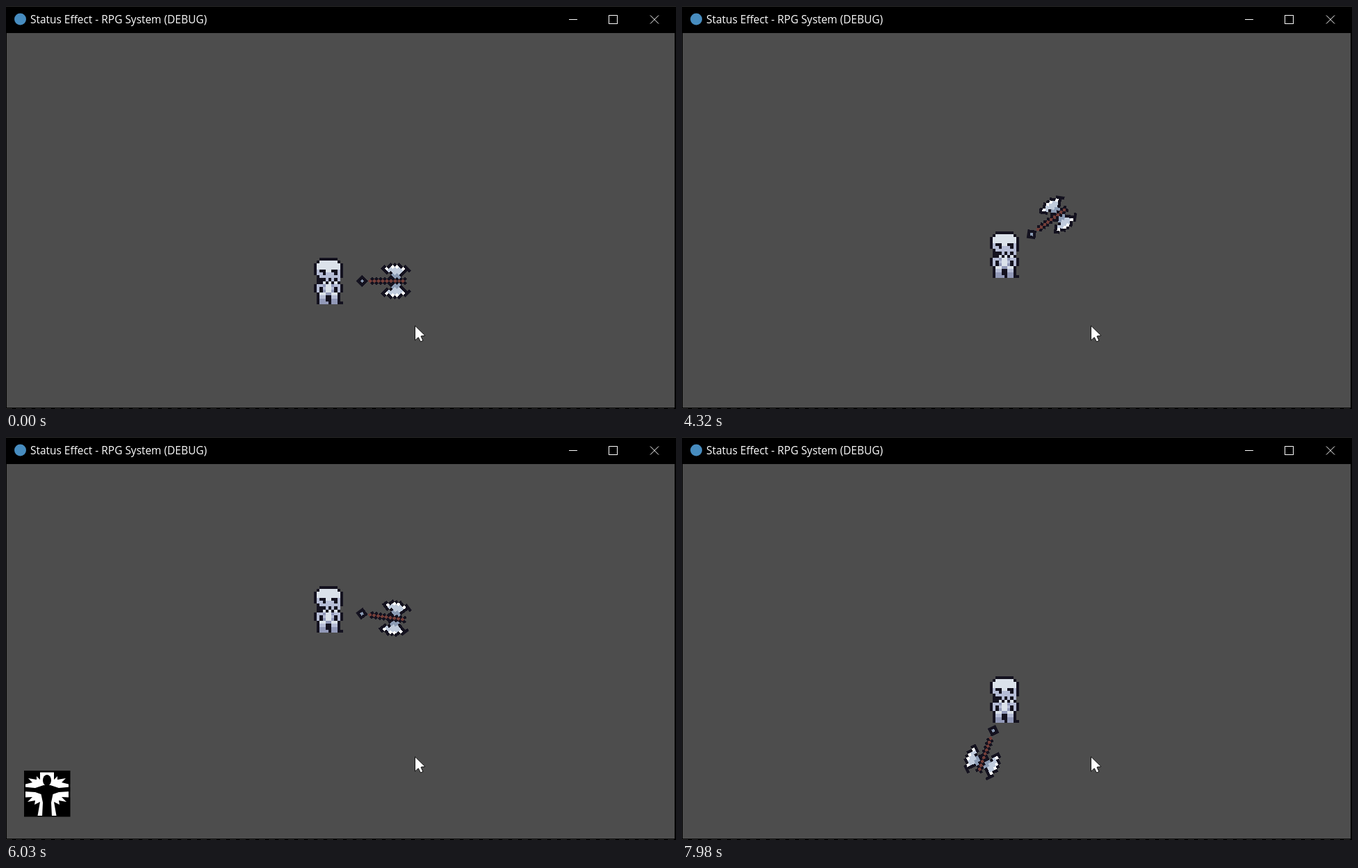
Write an HTML page with a canvas that moves like this. It is 964 px wide and 581 px high and loops after 8000 ms.

```html
<!DOCTYPE html>
<html lang="en">
<head>
<meta charset="utf-8">
<title>Status Effect</title>
<style>
  html, body { margin: 0; width: 100%; height: 100%; overflow: hidden; background: #000; }
  canvas, svg { position: absolute; left: 0; top: 0; width: 964px; height: 581px; }
  text { font: 15.45px "Open Sans", "Noto Sans", sans-serif; fill: #fff; }
  .line { fill: none; stroke: #fff; }
</style>
</head>
<body>
<canvas id="stage" width="964" height="581"></canvas>
<svg viewBox="0 0 964 581">
  <path d="M0 .5H964" stroke="#2b2b2b"/>
  <path d="M0 580.5H964" stroke="#2b2b2b" stroke-dasharray="9 5"/>
  <circle cx="20.5" cy="19" r="8.5" fill="#478cbf"/>
  <text x="35" y="25">Status Effect - RPG System (DEBUG)</text>
  <g class="line">
    <path d="M810 19.5H822"/>
    <rect x="867.5" y="13.5" width="12" height="12"/>
    <path d="M927 13.5L939 25.5M939 13.5L927 25.5"/>
  </g>

  <g id="stun" visibility="hidden">
    <rect x="26" y="481" width="66.5" height="66.5"/>
    <ellipse cx="58.3" cy="514.3" rx="21.2" ry="31.2" fill="#fff"/>
    <path d="M40 515.5q8 6 16 0m5 0q8 6 16 0" fill="none" stroke="#000" stroke-width="2.4"/>
    <path d="M49 538q1 -8.500 9.500 -8.500t10 8.500l-2 2q-8 -4.500 -15.500 0z"/>
  </g>

  <g id="haste" visibility="hidden">
    <rect x="26" y="481" width="66.5" height="66.5"/>
    <g id="half">
      <path fill="#fff" d="M59 483.5H49V494L44 489V494L32 492L38 498L28 500.5V519.5L38 519L31 526L42 524L41 530L49 526L45.5 546H59Z"/>
      <path d="M59.500 502H54L42 506L26 504.500V511L42 512L50.500 515L53 527L52 547H59.500Z"/>
    </g>
    <use href="#half" transform="matrix(-1 0 0 1 118 0)"/>
    <ellipse cx="59" cy="495" rx="6" ry="8"/>
  </g>

  <path d="M588.5 461V482L593.3 477.7L596.5 484L600 482.4L597 476L603 475.2Z" fill="#fff" stroke="#111"/>
</svg>
<script>
const INK = '#14121f', BONE = '#dbe2ea', LILAC = '#b6bdd6', GREY = '#9299b8';
const STEEL = '#c0cbdc', SHADE = '#8b9bb4';
const LOOP = 8000, WAKE = 3470, STUN_STEP = 7;
const HASTE_START = 23.2, HASTE_LENGTH = 45.15;
const CENTER_X = 464.2, AXE_RADIUS = 86.6, SIZE = 66.7;
const START_Y = 396.5, WALK = 5.56, SPIN = 16;
const TURNS = [3.5, 8.4, 21.2, 35.2, 82];

const clamp = (v, low, high) => Math.min(high, Math.max(low, v));

function stepAt(t) {
  return t < WAKE
    ? Math.min(STUN_STEP, Math.floor(t / 67))
    : STUN_STEP + 1 + Math.floor((t - WAKE + 28) / 67.3);
}

// Steps of normal-speed action: the stun costs a little, haste counts double.
function actionAt(step) {
  return step - clamp((step - 6) / 2, 0, 0.8) + clamp(step - HASTE_START, 0, HASTE_LENGTH);
}

// Walks down first and reverses at every turn.
function walkY(action) {
  return TURNS.reduce((y, turn, i) => {
    const time = clamp(action, turn, TURNS[i + 1] ?? Infinity) - turn;
    return y + (i % 2 ? -1 : 1) * WALK * time;
  }, START_Y);
}

function makeSprite(width, paint) {
  const canvas = document.createElement('canvas');
  canvas.width = width;
  canvas.height = 16;
  const g = canvas.getContext('2d');
  paint((color, x, y, w = 1, h = 1) => {
    g.fillStyle = color;
    g.fillRect(x, y, w, h);
  });
  return canvas;
}

const skeleton = makeSprite(10, box => {
  const pair = (color, x, y, w = 1, h = 1) => {
    box(color, x, y, w, h);
    box(color, 10 - x - w, y, w, h);
  };
  // Skull
  box(INK, 2, 0, 6);
  box(INK, 1, 1, 8, 8);
  box(INK, 0, 2, 10, 4);
  box(BONE, 2, 1, 6);
  box(BONE, 1, 2, 8, 2);
  box(LILAC, 1, 4, 8, 2);
  box(LILAC, 2, 6, 7);
  box(INK, 9, 6);
  box(BONE, 4, 4, 2);
  for (const eye of [2, 6]) {
    box(INK, eye, 4, 2);
    box(INK, eye + 1, 5);
  }
  for (let x = 3; x < 8; x += 2) {
    box(LILAC, x + 1, 7);
    box(BONE, x, 8);
  }
  // Arms, ribs and legs
  box(INK, 0, 9, 10, 3);
  box(INK, 1, 12, 8, 4);
  pair(LILAC, 1, 9, 1, 3);
  pair(LILAC, 2, 9);
  for (let y = 9; y < 12; y++) pair(y % 2 ? GREY : LILAC, 3, y);
  box(BONE, 4, 9, 2, 3);
  pair(BONE, 2, 12, 2);
  pair(GREY, 4, 12);
  pair(LILAC, 2, 13, 2);
  pair(GREY, 2, 14, 2, 2);
  box(GREY, 4, 15);
  box(INK, 9, 15);
});

// Blade outline by distance along the handle and across it.
const MIDDLE = 3.3;
const arc = along => 8.6 - (along - MIDDLE) ** 2 / 18;
function inBlade(along, across) {
  const reach = Math.abs(along - MIDDLE);
  return reach < 7 && reach < 2.4 + (across - 2) ** 2 / 2 && across <= arc(along);
}

function axeColor(along, across) {
  if (along < -9) return along === -13 && across === 0 ? SHADE : INK;
  if (across === 0) return along < 8 ? (along % 4 ? '#733e39' : '#5f3238') : null;
  if (across === 1) return along < 9 ? INK : null;
  if (!inBlade(along, across)) return null;
  const inner = [-1, 1].every(da => [-1, 1].every(dc => inBlade(along + da, across + dc)));
  if (!inner) return INK;
  if (across > arc(along) - 2) return '#fff';
  return across < 4 ? SHADE : STEEL;
}

// The handle lies on the rising diagonal.
const axe = makeSprite(16, box => {
  for (let x = 0; x < 16; x++) {
    for (let y = 0; y < 16; y++) {
      const pommel = x < 3 && y > 12;
      const along = x - y, across = Math.abs(x + y - 15);
      if (along < -9 && !pommel) continue;
      const color = pommel && !(x === 1 && y === 14) ? INK : axeColor(along, across);
      if (color) box(color, x, y);
    }
  }
});

const ctx = document.getElementById('stage').getContext('2d');
const stun = document.getElementById('stun');
const haste = document.getElementById('haste');
const show = (node, on) => node.setAttribute('visibility', on ? 'visible' : 'hidden');

function draw(step) {
  const action = actionAt(step);
  const y = walkY(action);
  ctx.resetTransform();
  ctx.imageSmoothingEnabled = false;
  ctx.fillStyle = '#000';
  ctx.fillRect(0, 0, 964, 581);
  ctx.fillStyle = '#4d4d4d';
  ctx.fillRect(1, 39, 961, 540);
  ctx.drawImage(skeleton, 443, Math.round(y - SIZE / 2), 42, 67);
  ctx.translate(CENTER_X, y);
  ctx.rotate(action * SPIN * Math.PI / 180);
  ctx.translate(AXE_RADIUS, 0);
  ctx.rotate(Math.PI / 4);
  ctx.drawImage(axe, -SIZE / 2, -SIZE / 2, SIZE, SIZE);
  show(stun, step === STUN_STEP);
  show(haste, step > HASTE_START && step < HASTE_START + HASTE_LENGTH);
}

function tick() {
  draw(stepAt(performance.now() % LOOP));
  requestAnimationFrame(tick);
}
tick();
</script>
</body>
</html>
```
